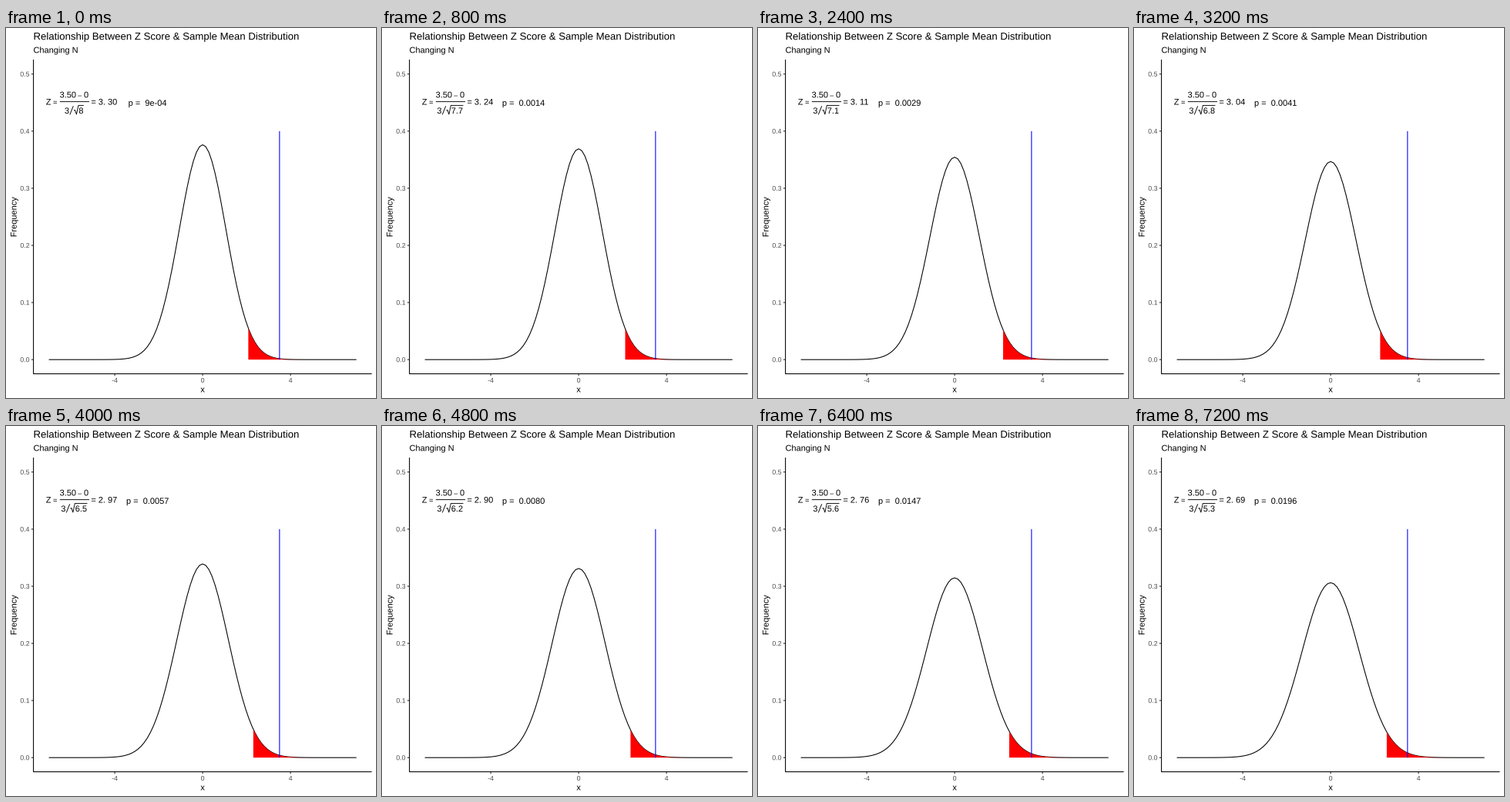
Write a matplotlib script that moves like this. It is 480 px wide and 480 px high and loops after 8 s.

```python
import math

import matplotlib.pyplot as plt
import numpy as np
from matplotlib.animation import FuncAnimation
from matplotlib.patches import PathPatch
from matplotlib.textpath import TextPath
from matplotlib.transforms import Affine2D

SIZE, DPI = 480, 100
PT = 72 / DPI              # points per pixel
LINE = 1.07 * PT
THIN = 0.9 * PT
FONT = {"family": "Liberation Sans"}
SIGMA, MEAN = 3, 3.5
STEPS, STEP_MS = 10, 800

fig = plt.figure(figsize=(SIZE / DPI, SIZE / DPI), dpi=DPI, facecolor="white")
ax = fig.add_axes([0, 0, 1, 1])
ax.set_xlim(0, SIZE)
ax.set_ylim(SIZE, 0)
ax.axis("off")


def sx(x):
    return 255.1 + 28.5 * x


def sy(y):
    return 430.2 - 741 * y


def line(xs, ys, color="black", width=LINE):
    return ax.plot(xs, ys, color=color, lw=width, snap=False,
                   solid_capstyle="butt")[0]


def glyphs(x, y, text, size=11, align=0, angle=0):
    """Outline of a text; align is 0 for left, 0.5 for centre, 1 for right."""
    path = TextPath((0, 0), text, size=size, prop=FONT)
    box = path.get_extents()
    shift = -align * (box.x0 + box.x1)
    if align == 1:
        shift = -box.x1
    place = Affine2D().translate(shift, 0).scale(1, -1)
    return place.rotate_deg(-angle).translate(x, y).transform_path(path)


def label(x, y, text, size=11, color="black", align=0, angle=0):
    patch = PathPatch(glyphs(x, y, text, size, align, angle),
                      facecolor=color, lw=0, snap=False)
    return ax.add_patch(patch)


def density(x, sd):
    return np.exp(-0.5 * (x / sd) ** 2) / (sd * math.sqrt(2 * math.pi))


def p_text(n):
    # one-sided tail, scaled by the variance of the mean
    z = MEAN * n / SIGMA ** 2
    p = round(0.5 * math.erfc(z / math.sqrt(2)), 4)
    return f"{p:.0e}" if p < 0.001 else f"{p:.4f}"


# titles and axes
label(35.5, 15.2, "Relationship Between Z Score & Sample Mean Distribution", 13.2)
label(35.5, 32.3, "Changing N")
label(255.1, 472.5, "x", align=0.5)
label(13.6, 244.8, "Frequency", align=0.5, angle=90)

for v in (-4, 0, 4):
    line([sx(v)] * 2, [448.5, 451.3], "#333333")
    label(sx(v), 460, str(v), 8.8, "#4d4d4d", 0.5)
for k in range(6):
    y = sy(k / 10)
    line([32.8, 35.6], [y, y], "#333333")
    label(30.2, y + 3.1, f"{k / 10:.1f}", 8.8, "#4d4d4d", 1)
line([35.6, 35.6, 474.5], [41, 448.6, 448.6])

# fixed parts of the formula
label(51.8, 99.5, "Z")
label(61, 99.5, "=", 9.5)
label(69.6, 90.3, "3.50")
label(93.2, 90.3, "–", 9)
label(101, 90.3, "0")
line([69.8, 108], [95.6, 95.6], width=THIN)
label(110.4, 99.5, "=")

# moving parts; the filled tail lies over the curve
xs = np.linspace(-7, 7, 101)
curve = line([], [])
area = ax.fill([0], [0], color="red", lw=0, zorder=2)[0]
line([sx(MEAN)] * 2, [sy(0), sy(0.4)], "blue")
slash = line([], [], width=THIN)
root = line([], [], width=THIN)
three, n_label, z_label, p_label = (label(0, 0, "0") for _ in range(4))


def draw(i):
    n = 8 - 0.3 * i
    sd = SIGMA / math.sqrt(n)

    curve.set_data(sx(xs), sy(density(xs, sd)))
    tail = np.linspace(1.96 * sd, 7, 101)
    top = np.column_stack([sx(tail), sy(density(tail, sd))])
    area.set_xy(np.vstack([[sx(tail[0]), sy(0)], top, [sx(7), sy(0)]]))

    number = f"{n:.1f}".removesuffix(".0")
    width = 6.12 if len(number) == 1 else 15.3
    left = 79 - width / 2
    three.set_path(glyphs(left, 111, "3"))
    slash.set_data([left + 6.9, left + 11.4], [112.4, 101.2])
    root.set_data(left + np.array([12.2, 13.5, 15.5, 18, 18.8 + width]),
                  [107.3, 106.3, 112, 100.4, 100.4])
    n_label.set_path(glyphs(left + 18.4, 111, number))

    whole, cents = f"{MEAN / sd:.2f}".split(".")
    z_label.set_path(glyphs(119.8, 99.5, f"{whole}. {cents}"))
    p_label.set_path(glyphs(183.75, 100.9, f"p =  {p_text(n)}", align=0.5))
    return area, curve, slash, root, three, n_label, z_label, p_label


anim = FuncAnimation(fig, draw, frames=STEPS, interval=STEP_MS, repeat=True,
                     repeat_delay=0)
plt.show()
```
